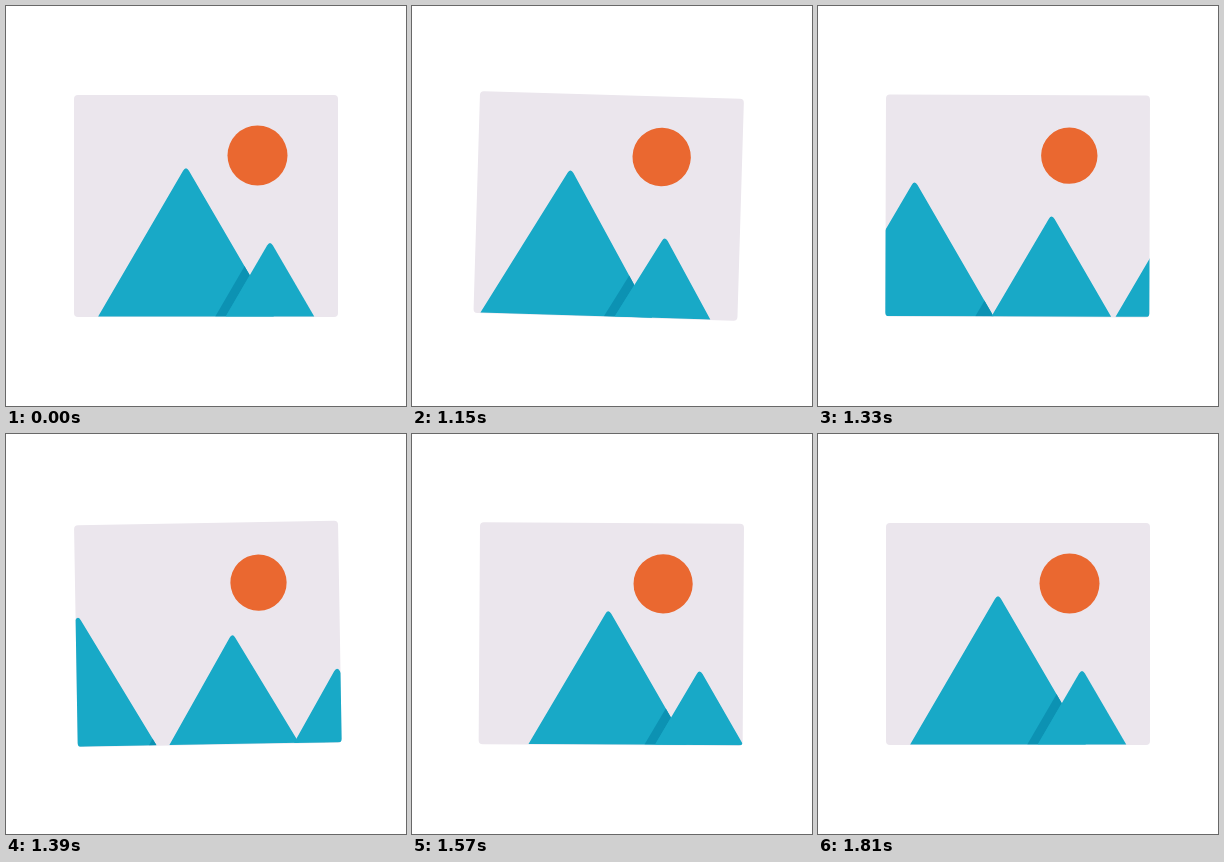
An HTML page with a canvas for the animation above (1.9 s loop, 400 px wide and 400 px high).

```html
<!DOCTYPE html>
<html lang="en">
<head>
<meta charset="utf-8">
<title>Swinging picture</title>
<style>
  html, body { margin: 0; width: 100%; height: 100%; overflow: hidden; background: #fff; }
  canvas { display: block; }
</style>
</head>
<body>
<canvas id="stage" width="400" height="400"></canvas>
<script>
const ctx = document.getElementById('stage').getContext('2d');
const LOOP = 1900, START = 1000, END = 1810, STEP = 30;
const BASE = 310.4, SLOPE = 0.583;
const PIVOT = { x: 200, y: 89 };
const COLORS = { card: '#ebe6ed', hill: '#18a9c7', shade: '#0c92b3', sun: '#ea6830' };

// [time, value] keys
const SWING = [[1000, 0], [1030, .22], [1150, 1.7], [1195, 1.75], [1330, .18],
               [1405, -1.15], [1450, -.87], [1570, .35], [1620, .48], [1810, 0]];
const SUN = [[1000, 30], [1150, 29.2], [1330, 28.2], [1380, 28.1],
             [1450, 28.5], [1570, 29.6], [1660, 30], [1810, 30]];

const mix = (a, b, p) => a + (b - a) * p;
const clamp = v => Math.min(1, Math.max(0, v));

// Smooth curve through the keys, at rest at both ends
function track(keys, t) {
  const last = keys.length - 1;
  if (t <= keys[0][0]) return keys[0][1];
  if (t >= keys[last][0]) return keys[last][1];
  const i = keys.findIndex(k => k[0] > t) - 1;
  const tangent = j => j === 0 || j === last ? 0 :
    (keys[j + 1][1] - keys[j - 1][1]) / (keys[j + 1][0] - keys[j - 1][0]);
  const [t0, a] = keys[i], [t1, b] = keys[i + 1];
  const h = t1 - t0, u = (t - t0) / h, v = 1 - u;
  return a * v * v * (1 + 2 * u) + b * u * u * (3 - 2 * u)
    + h * u * v * (tangent(i) * v - tangent(i + 1) * u);
}

function hillPath({ x, y }) {
  const half = (BASE - y) * SLOPE, tip = 5;
  const path = new Path2D();
  path.moveTo(x - half, BASE);
  path.lineTo(x - tip * SLOPE, y + tip);
  path.quadraticCurveTo(x, y, x + tip * SLOPE, y + tip);
  path.lineTo(x + half, BASE);
  path.closePath();
  return path;
}

function fill(path, color) {
  ctx.fillStyle = color;
  ctx.fill(path);
}

// Strip along the left side of the front hill, falling on the back hill
function drawShade(back, front, width) {
  if (width <= 0) return;
  const left = front.x - (BASE - front.y) * SLOPE;
  const strip = new Path2D();
  strip.moveTo(left - width, BASE);
  strip.lineTo(front.x - width, front.y);
  strip.lineTo(front.x, front.y);
  strip.lineTo(left, BASE);
  ctx.save();
  ctx.clip(hillPath(back));
  fill(strip, COLORS.shade);
  ctx.restore();
}

function draw(t) {
  const p = (1 - Math.cos(Math.PI * clamp((t - START) / (END - START)))) / 2;
  const leaving = { x: mix(180, -53, p), y: mix(159.7, 201, p) };
  const growing = { x: mix(264, 180, p), y: mix(234.5, 159.7, p) };
  const arriving = { x: mix(386, 264, p), y: 234.5 };

  ctx.clearRect(0, 0, 400, 400);
  ctx.save();
  ctx.translate(PIVOT.x, PIVOT.y);
  ctx.rotate(track(SWING, t) * Math.PI / 180);
  ctx.translate(-PIVOT.x, -PIVOT.y);

  const card = new Path2D();
  card.roundRect(68, 89, 264, 222, 4);
  fill(card, COLORS.card);
  ctx.clip(card);

  const sun = new Path2D();
  sun.arc(251.5, 149.5, track(SUN, t), 0, 2 * Math.PI);
  fill(sun, COLORS.sun);

  fill(hillPath(leaving), COLORS.hill);
  drawShade(leaving, growing, 10.5 + 45 * p * p);
  fill(hillPath(growing), COLORS.hill);
  drawShade(growing, arriving, 10.5 * clamp((p - .59) / .2));
  fill(hillPath(arriving), COLORS.hill);
  ctx.restore();
}

function tick() {
  const t = performance.now() % LOOP;
  draw(START + STEP * Math.floor((t - START) / STEP));
  requestAnimationFrame(tick);
}
tick();
</script>
</body>
</html>
```
